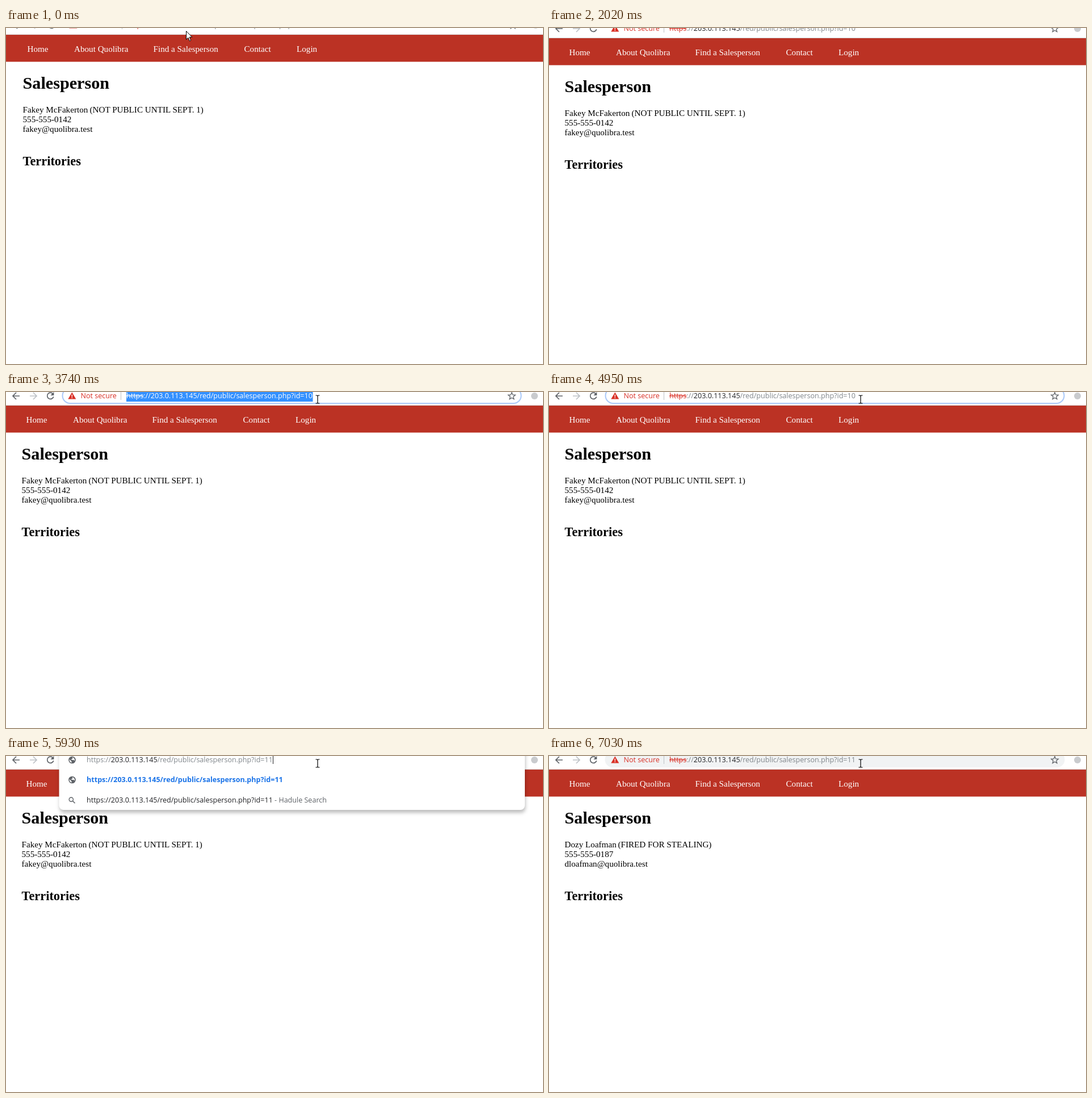
An HTML page that plays this animation: 946 px wide and 592 px high, repeating every 8000 ms.

```html
<!DOCTYPE html>
<html lang="en">
<head>
<meta charset="utf-8">
<title>Salesperson page</title>
<style>
  html, body { margin: 0; width: 100%; height: 100%; overflow: hidden; background: #fff; }
  svg { display: block; width: 946px; height: 592px; }
  text { white-space: pre; }
  .page { font: 15.15px "Liberation Serif", "Times New Roman", serif; }
  .ui { font: 12.55px "Open Sans", "Noto Sans", sans-serif; }
  .b { font-weight: 700; }
</style>
</head>
<body>
<svg id="stage" viewBox="0 0 946 592"></svg>
<script>
const LOOP = 8000;
const GREY = '#5f6368', DIM = '#80868b', INK = '#202124', BLUE = '#1a73e8', RED = '#d93025';
const HOST = '203.0.113.145', PATH = '/red/public/salesperson.php?id';
const stage = document.getElementById('stage');

// Each entry changes part of the state from its time on.
const steps = [
  [0, { dx: 2, dy: -12, hover: 0, chip: 1, id: '10', person: 0, cur: ['arrow', 317, 5] }],
  [830, { hover: .5, cur: ['beam', 307, 6] }],
  [950, { hover: 1 }],
  [1200, { cur: ['beam', 308, 5] }],
  [1340, { cur: ['beam', 318, 4] }],
  [1470, { cur: ['beam', 333, 1] }],
  [1600, { cur: null }],
  [2020, { dx: 0, dy: -6, hover: 0 }],
  [2150, { dy: -5 }],
  [2300, { dy: -3 }],
  [2550, { dy: 0 }],
  [2960, { cur: ['arrow', 426, 34] }],
  [3080, { cur: ['arrow', 478, 32] }],
  [3200, { cur: ['arrow', 527, 27] }],
  [3330, { cur: ['arrow', 545, 20] }],
  [3470, { hover: .5, cur: ['beam', 549, 13] }],
  [3590, { hover: 1 }],
  [3740, { focus: true, select: true }],
  [4410, { select: false, caret: true }],
  [4950, { caret: false }],
  [5350, { focus: false, open: 1, list: 'one', id: '1', caret: true }],
  [5500, { list: 'none', id: '' }],
  [5650, { list: 'one', id: '1' }],
  [5930, { list: 'two', id: '11' }],
  [6320, { open: .36, caret: false, chip: 0, loading: true }],
  [6470, { open: 0 }],
  [6870, { chip: .2, person: 1, loading: false }],
  [7030, { chip: 1 }]
];

const people = [
  ['Fakey McFakerton', 145.5, '(NOT PUBLIC UNTIL SEPT. 1)', '555-555-0142', 'fakey@quolibra.test'],
  ['Dozy Loafman', 121.5, '(FIRED FOR STEALING)', '555-555-0187', 'dloafman@quolibra.test']
];

// Suggestion rows: [tail, title, address x]
const lists = {
  none: [['='], ['=1', 'Marla Hodge', 304.5], ['=6', 'Francesca Tilby', 321.5],
         ['=2', 'Lorena Castile', 315], ['=4']],
  one: [['=1'], ['=1', 'Marla Hodge', 304.5], ['=10']],
  two: [['=11']]
};

const rect = (x, y, w, h, fill, extra = '') =>
  `<rect x="${x}" y="${y}" width="${w}" height="${h}" fill="${fill}" ${extra}/>`;
const text = (x, y, s, fill = '#000', extra = '') =>
  `<text x="${x}" y="${y}" fill="${fill}" ${extra}>${s}</text>`;
const span = (s, fill, extra = '') => `<tspan fill="${fill}" ${extra}>${s}</tspan>`;
const line = (d, color, w = 1.7) =>
  `<path d="${d}" fill="none" stroke="${color}" stroke-width="${w}"/>`;
const at = (x, y, s) => `<g transform="translate(${x} ${y})">${s}</g>`;

const globe = y => at(116.5, y,
  `<circle r="6.3" fill="${GREY}"/><path d="M-4.8-1.2L-1 2.4V5Q-5 3.6-4.8-1.2ZM0-4.8Q5-4 4.6 1.6L2.6 0H-1V-2H1Z" fill="#fff"/>`);
const lens = y => at(116, y,
  `<circle cx="-1.2" cy="-1.2" r="3.6" fill="none" stroke="${GREY}" stroke-width="1.4"/>` + line('M1.5 1.5L5.5 5.5', GREY, 1.6));
const info = at(116, 7,
  `<circle r="5.8" fill="none" stroke="${GREY}" stroke-width="1.3"/>` + line('M0-3.2V-1.6M0-.5V3.4', GREY, 1.4));
const warning = at(116.3, 7,
  `<path d="M0-6.5L7 5.5H-7Z" fill="${RED}"/>` + line('M0-2.4V1.4M0 2.5V4', '#fff', 1.4));

function star() {
  let d = '';
  for (let i = 0; i < 10; i++) {
    const a = i * Math.PI / 5, r = i % 2 ? 2.9 : 6.6;
    d += (i ? 'L' : 'M') + (r * Math.sin(a)).toFixed(2) + ' ' + (-r * Math.cos(a)).toFixed(2);
  }
  return at(891, 7.3, line(d + 'Z', GREY, 1.3));
}

function page(s) {
  const nav = [[35.5, 'Home'], [118, 'About Quolibra'], [257.5, 'Find a Salesperson'],
               [417.5, 'Contact'], [510, 'Login']];
  const [name, noteX, note, phone, mail] = people[s.person];
  return `<g class="page">` + rect(-4, 24, 954, 47.5, '#bb3224') +
    nav.map(([x, label]) => text(x, 54, label, '#fff')).join('') +
    text(27.5, 119, 'Salesperson', '#000', 'font-size="30.2" class="b"') +
    text(27.5, 160.5, name) + text(noteX, 160.5, note) +
    text(27.5, 177.7, phone) + text(27.5, 194.9, mail) +
    text(27.5, 254, 'Territories', '#000', 'font-size="22.4" class="b"') + '</g>';
}

function panel(s) {
  if (!s.open) return '';
  const rows = lists[s.list], n = rows.length;
  const bottom = 23.5 + 35.8 * (n + 1);
  let out = rect(93.5, -20, 820.5, bottom + 20, '#fff', 'rx="8" style="filter:drop-shadow(1px 5px 3px rgba(0,0,0,.26))"');
  rows.forEach(([tail, title, x = 142], i) => {
    const y = 42 + 35.8 * i, bold = s.list === 'two' ? tail : '';
    out += globe(y);
    if (title) out += text(142, y + 4.2, 'Salesperson: ' + title, INK) + text(x - 9.5, y + 4.2, '-', GREY);
    out += text(x, y + 4.2, span('https://' + HOST + PATH + bold, BLUE, 'class="b"') +
      (bold ? '' : span(tail, BLUE)));
  });
  const y = 42 + 35.8 * n;
  out += lens(y) + text(142, y + 4.2,
    span('https://' + HOST + PATH + '=' + s.id, INK) + span(' - Hadule Search', GREY));
  return `<g opacity="${s.open}">${out}</g>`;
}

function toolbar(s) {
  const full = s.open === 1;
  let out = line('M24 7H12.5M18 1L12 7L18 13', GREY) + line('M42 7H53.5M48 1L54 7L48 13', '#bdc1c6');
  out += s.loading ? line('M73.5 2L83 11.5M83 2L73.5 11.5', GREY)
    : line('M82.6 3.2A5.6 5.6 0 1 0 83.7 8.2', GREY) + `<path d="M84.4 0V6H78.4Z" fill="${GREY}"/>`;
  out += '<circle cx="931" cy="7" r="6" fill="#c9cbce"/>';

  if (!full) {
    if (s.hover && !s.focus) out += rect(98.5, -7, 810, 27, '#f1f3f4', `rx="13.5" opacity="${s.hover}"`);
    if (s.focus) out += rect(99.5, -7, 808, 27, '#fff', 'rx="13.5" stroke="#a9c8f8" stroke-width="2"');
    out += star();
  }

  let x = 142;
  if (full) out += globe(7);
  else if (!s.chip) { out += info; x = 131.5; }
  else {
    out += warning;
    x = s.chip < 1 ? 131.5 + 80 * s.chip : 212;
    if (s.chip === 1) out += text(131.5, 11.2, 'Not secure', RED) + rect(202, 0, 1, 14, '#bdc1c6');
  }

  const pick = c => s.select ? '#fff' : c;
  const secure = full || !s.chip;
  if (s.select) out += rect(212, 0, 328.5, 17, '#3390ff');
  const scheme = secure ? span('https://', DIM)
    : span('https', pick(RED), 'text-decoration="line-through"') + span('://', pick(DIM));
  out += text(x, 11.2, scheme + span(HOST, pick(INK)) + span(PATH + '=' + s.id, pick(DIM)));
  if (s.caret) out += rect(Math.round(x + 313.7 + 7.16 * s.id.length), 0, 1, 14, INK);
  return out;
}

function cursor(c) {
  if (!c) return '';
  const [kind, x, y] = c;
  return at(x, y, kind === 'arrow'
    ? '<path d="M.5.5V15.2L3.9 12L6.3 17.8L8.6 16.8L6.2 11.1H10.8Z" fill="#fff" stroke="#000" stroke-width="1"/>'
    : line('M-3.5-7H-1L0-6L1-7H3.5M0-6V6M-3.5 7H-1L0 6L1 7H3.5', '#000', 1.2));
}

function draw(s) {
  stage.innerHTML = rect(0, 0, 946, 592, '#fff') +
    `<g transform="translate(${s.dx} ${s.dy})">` + page(s) +
    rect(-4, -20, 954, 43, '#fff') + rect(-4, 23, 954, 1, '#d6d4d4') +
    `<g class="ui">` + panel(s) + toolbar(s) + '</g></g>' + cursor(s.cur);
}

let shown = -1;
function frame() {
  const t = performance.now() % LOOP;
  const past = steps.filter(([when]) => when <= t);
  if (past.length !== shown) {
    shown = past.length;
    draw(Object.assign({}, ...past.map(([, change]) => change)));
  }
  requestAnimationFrame(frame);
}
frame();
</script>
</body>
</html>
```
